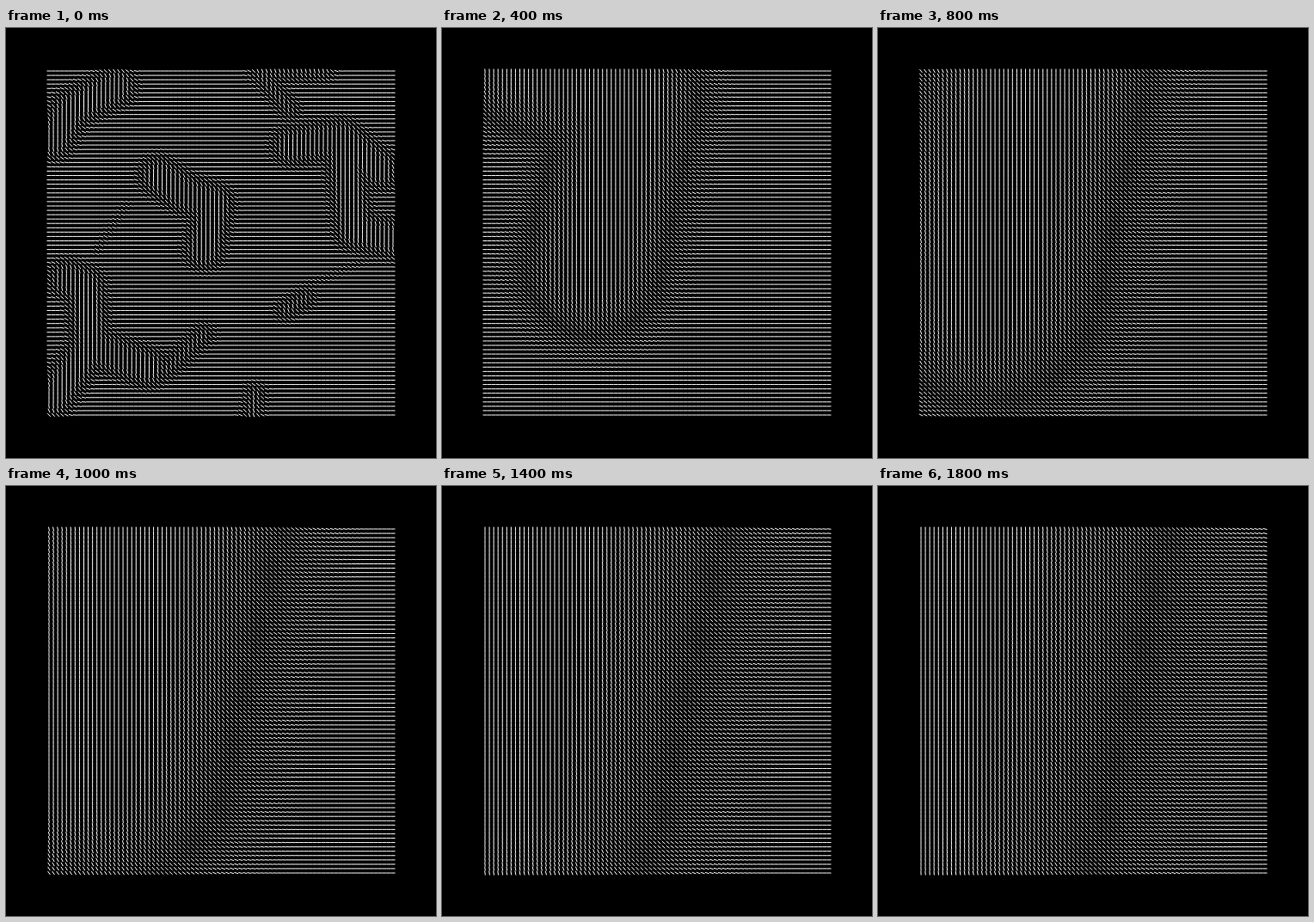
These frames come from a looping animation (500 px wide and 500 px high, 2 s). An HTML page with a canvas:

```html
<!DOCTYPE html>
<html>
<head>
<meta charset="utf-8">
<style>
  html, body { margin: 0; width: 100%; height: 100%; overflow: hidden; background: #000; }
  canvas { display: block; }
</style>
</head>
<body>
<canvas id="stage" width="500" height="500"></canvas>
<script>
const ctx = document.getElementById('stage').getContext('2d');
const SIZE = 500, CENTER = SIZE / 2, MARGIN = 50, CELLS = 80, HALF = 2.5;
const SPACING = (SIZE - 2 * MARGIN) / (CELLS - 1);
const STEPS = 10, STEP_MS = 200, ZOOM_PER_STEP = 1.35;
const EDGE = 16; // half width of the turn from flat to upright

// Ridges of the field, as x, y pairs along each path
const ridges = [
  { radius: 21, paths: [
    [178, 172, 208, 193, 242, 204, 230, 258],
    [55, 130, 75, 95, 128, 68],
    [332, 137, 390, 128, 405, 235, 452, 245],
    [390, 128, 435, 165],
    [72, 292, 92, 300, 98, 370, 165, 395],
    [98, 370, 55, 430]] },
  { radius: 8, paths: [
    [370, 50, 295, 52, 330, 95],
    [325, 328, 348, 314],
    [185, 398, 230, 356],
    [285, 455, 290, 425]] },
  { radius: -4, paths: [
    [105, 260, 140, 205],
    [350, 300, 420, 268]] }
];

const clamp01 = v => Math.max(0, Math.min(1, v));
const smooth = t => t * t * (3 - 2 * t);

function segmentDistance(x, y, ax, ay, bx, by) {
  const dx = bx - ax, dy = by - ay;
  const t = clamp01(((x - ax) * dx + (y - ay) * dy) / (dx * dx + dy * dy));
  return Math.hypot(x - ax - dx * t, y - ay - dy * t);
}

function angleAt(x, y) {
  let depth = -EDGE;
  for (const { radius, paths } of ridges) {
    for (const p of paths) {
      for (let i = 0; i + 3 < p.length; i += 2) {
        depth = Math.max(depth, radius - segmentDistance(x, y, p[i], p[i + 1], p[i + 2], p[i + 3]));
      }
    }
  }
  return smooth(clamp01((depth + EDGE) / (2 * EDGE))) * Math.PI / 2;
}

function draw(step) {
  const zoom = 1 + ZOOM_PER_STEP * step;
  const toField = v => CENTER + (v - CENTER) / zoom;
  ctx.fillStyle = '#000';
  ctx.fillRect(0, 0, SIZE, SIZE);
  ctx.strokeStyle = '#fff';
  for (let row = 0; row < CELLS; row++) {
    for (let col = 0; col < CELLS; col++) {
      const x = MARGIN + col * SPACING, y = MARGIN + row * SPACING;
      const angle = angleAt(toField(x), toField(y));
      const dx = HALF * Math.cos(angle), dy = HALF * Math.sin(angle);
      ctx.beginPath();
      ctx.moveTo(x - dx, y - dy);
      ctx.lineTo(x + dx, y + dy);
      ctx.stroke();
    }
  }
}

const start = performance.now();
let shown = -1;
function tick() {
  const step = Math.floor((performance.now() - start) / STEP_MS) % STEPS;
  if (step !== shown) draw(shown = step);
  requestAnimationFrame(tick);
}
tick();
</script>
</body>
</html>
```
